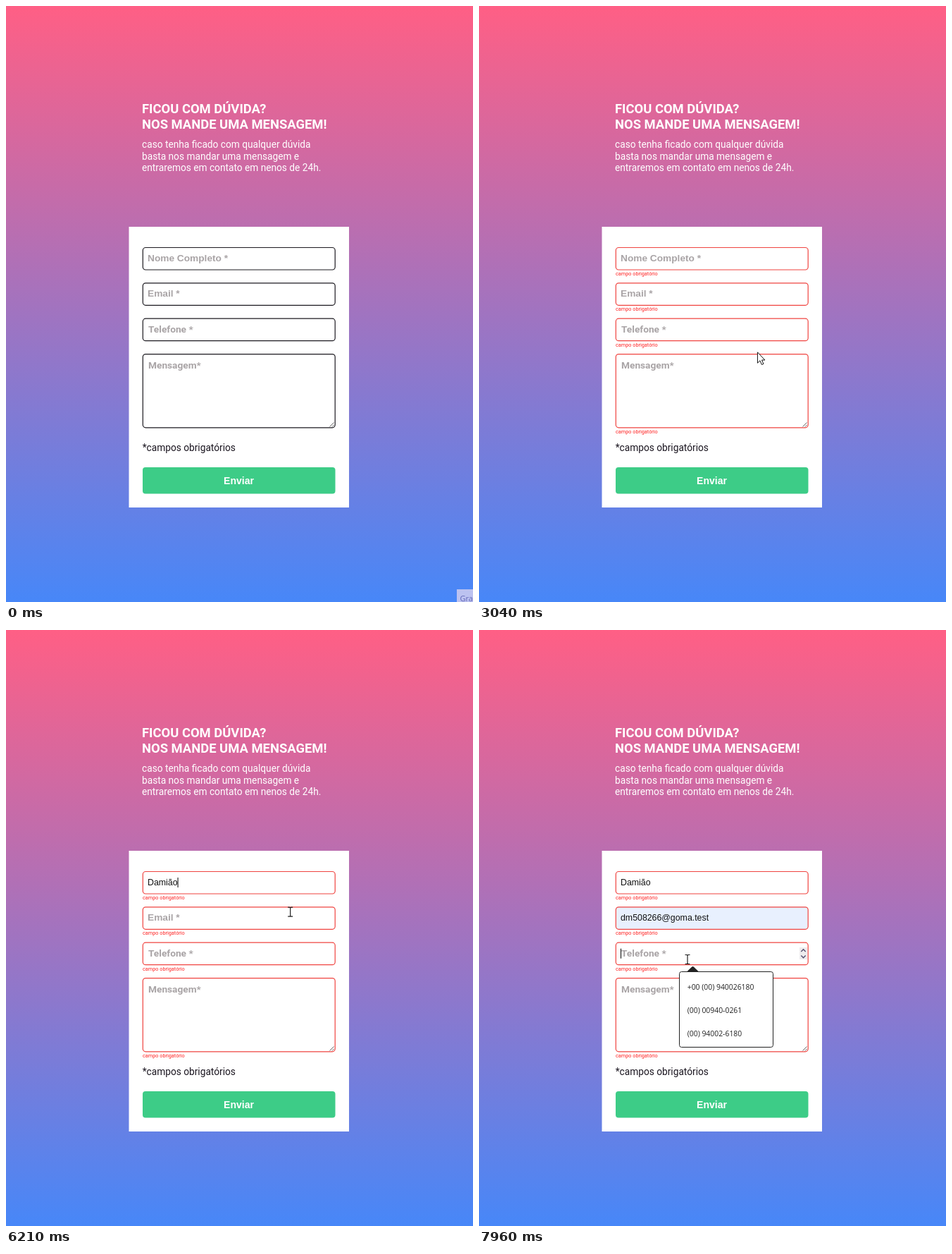
Write an HTML page that moves like this. It is 663 px wide and 845 px high and loops after 8000 ms.

```html
<!DOCTYPE html>
<html lang="pt-BR">
<head>
<meta charset="utf-8">
<title>Formulário de contato</title>
<style>
html, body { margin: 0; width: 100%; height: 100%; overflow: hidden; }
svg { display: block; width: 100vw; height: 100vh; }
text { white-space: pre; }
.title { font: 700 18.4px Roboto, sans-serif; fill: #fff; }
.body { font: 400 13.71px Roboto, sans-serif; }
.error { font: 400 7.3px Roboto, sans-serif; fill: #f22; }
.hint { font: 700 13.7px "Liberation Sans", Arial, sans-serif; fill: #a9a4a6; }
.hint.alt { font-family: Roboto, sans-serif; }
.value { font: 400 12.35px "Liberation Sans", Arial, sans-serif; fill: #111; }
.send { font: 700 14px "Liberation Sans", Arial, sans-serif; fill: #fff; }
.item { font: 400 10.4px "Open Sans", "Noto Sans", sans-serif; fill: #222; }
.tag { font: 400 11px "Open Sans", "Noto Sans", sans-serif; fill: #6468b8; }
</style>
</head>
<body>
<svg viewBox="0 0 663 845" preserveAspectRatio="none">
  <defs>
    <linearGradient id="sky" x1="0" y1="0" x2="0" y2="1">
      <stop offset="0" stop-color="#ff5f85"/>
      <stop offset="1" stop-color="#4787f8"/>
    </linearGradient>
  </defs>
  <rect width="663" height="845" fill="url(#sky)"/>
  <g class="title">
    <text x="193" y="152">FICOU COM DÚVIDA?</text>
    <text x="193" y="174">NOS MANDE UMA MENSAGEM!</text>
  </g>
  <g class="body" fill="#fff">
    <text x="193" y="201">caso tenha ficado com qualquer dúvida</text>
    <text x="193" y="217.5">basta nos mandar uma mensagem e</text>
    <text x="193" y="234">entraremos em contato em nenos de 24h.</text>
  </g>
  <rect x="174.5" y="313" width="312.5" height="398" fill="#fff"/>
  <g id="fields"></g>
  <path d="M459.5 596.5 465.5 590.5M463 596.5 465.5 594" stroke="#555" stroke-width=".9"/>
  <g id="spinner">
    <rect x="455" y="450" width="11" height="17" fill="#eeecee"/>
    <path d="M457.3 456 460.5 452.8 463.7 456M457.3 461.5 460.5 464.7 463.7 461.5" fill="none" stroke="#555070" stroke-width="1.4"/>
  </g>
  <text class="body" x="193.7" y="631" fill="#1b1620">*campos obrigatórios</text>
  <rect x="194" y="654" width="273.5" height="37.5" rx="4" fill="#3dcc87"/>
  <text class="send" x="330.5" y="678" text-anchor="middle">Enviar</text>
  <rect id="caret" width="1" height="14" fill="#000"/>
  <g id="popup"></g>
  <g id="tag">
    <rect x="640" y="827" width="23" height="18" fill="#bcc2f0"/>
    <text class="tag" x="644.5" y="843.5">Gravando</text>
  </g>
  <circle id="click" cx="344" cy="677" r="11.2" fill="#c8e600" opacity=".72"/>
  <g id="cursor" stroke-linejoin="round">
    <path id="arrow" d="M.5 0V15.4L4 12 6.5 17.7 9 16.6 6.6 11.2H11Z" fill="#fff" stroke="#111"/>
    <path id="hand" d="M-1.3 1Q.3-.8 1.7 1V7Q3.3 5.8 4.6 7.5 6.2 6.6 7.3 8.3 9.5 7.8 9.7 10V14.5L7.8 18V20.5H-.8V18.4L-5.4 12.4Q-5.6 10-3.6 10.6L-1.3 12.6Z" fill="#fff" stroke="#111"/>
    <path id="ibeam" d="M-3.5-6.5H-1L0-5.7 1-6.5H3.5M0-5.7V5.7M-3.5 6.5H-1L0 5.7 1 6.5H3.5" fill="none" stroke="#222" stroke-width="1.2"/>
  </g>
</svg>
<script>
const LOOP = 8000, STEP = 67;
const $ = id => document.getElementById(id);
const show = (el, on) => el.setAttribute('visibility', on ? 'visible' : 'hidden');
const clamp = v => Math.max(0, Math.min(1, v));

const NAME = 'Damião', MAIL = 'dm508266@goma.test';
const users = ['damica_0713', 'damica_0712'];
const mails = [MAIL, ...['mbiacaetano', 'norbertoiara', 'Mbiacaetano',
  'elainebarreto.valdura', 'brunabarretopinho418'].map(s => s + '@goma.test')];
const phones = ['+00 (00) 940026180', '(00) 00940-0261', '(00) 94002-6180'];

const fields = [
  { hint: 'Nome Completo *', x: 201, y: 342.5, h: 31.5 },
  { hint: 'Email *', x: 201, y: 392.8, h: 31.5 },
  { hint: 'Telefone *', x: 202, y: 443.2, h: 31.5, alt: true },
  { hint: 'Mensagem*', x: 202, y: 493.6, h: 104.2, alt: true }
];

// The screen repaints in bursts and rests in between.
const bursts = [[0, 0], [70, 70], [1000, 1690], [2020, 2100], [2630, 3380], [3440, 3910],
  [4180, 4240], [4700, 4700], [4980, 5050], [5250, 5660], [5930, 6690], [6760, 7560],
  [7630, 7630], [7960, 7960]];

// time, x, y of the pointer
const path = [
  [1000, 590, 833], [1134, 478, 790], [1268, 416, 760], [1480, 362, 705], [1690, 344.5, 678],
  [2630, 346, 676], [2850, 368, 600], [3100, 405, 450], [3380, 426, 371],
  [3440, 428, 363], [3580, 430, 353], [3700, 431, 359], [4180, 431, 359], [4240, 432, 359],
  [5930, 432, 362], [6130, 410, 392], [6280, 396, 409], [6420, 394, 412], [6690, 382, 442],
  [6760, 378, 444], [6960, 366, 448], [7100, 350, 451], [7229, 324, 455],
  [7370, 302, 462], [7480, 293.5, 464.5], [7560, 294, 465], [7630, 295, 465.5], [7960, 296, 467]
];

const popups = [
  { from: 3710, to: 4240, y: 382, w: 144, list: [MAIL, ...users, 'bruna', NAME], fadeIn: true },
  { from: 4240, to: 5050, y: 382, w: 144, list: [MAIL, ...users, NAME] },
  { from: 5050, to: 5310, y: 382, w: 101, list: [...users, NAME] },
  { from: 5310, to: 5640, y: 382, w: 67, list: [NAME], fadeOut: true },
  { from: 6400, to: 7270, y: 433, w: 210, list: mails, fadeIn: true, fadeOut: true, hover: 6540 },
  { from: 7430, to: LOOP, y: 484, w: 133, list: phones, fadeIn: true }
];
const keys = [4180, 4980, 5050, 5250, 5310, 5450];

$('fields').innerHTML = fields.map(f => `
  <rect x="194.3" y="${f.y}" width="272.9" height="${f.h}" rx="4" fill="#fff" stroke-width="1.2"/>
  <text class="hint${f.alt ? ' alt' : ''}" x="${f.x}" y="${f.y + (f.h > 50 ? 20.6 : 19.6)}">${f.hint}</text>
  <text class="value" x="201" y="${f.y + 19.6}"></text>
  <text class="error" x="194" y="${f.y + f.h + 7.8}">campo obrigatório</text>`).join('');
const all = cls => [...$('fields').querySelectorAll(cls)];
const boxes = all('rect'), hints = all('.hint'), values = all('.value'), errors = all('.error');

function snap(t) {
  const [a, b] = bursts.filter(([from]) => from <= t).pop();
  return t >= b ? b : a + Math.floor((t - a) / STEP) * STEP;
}

function pointer(t) {
  const i = path.findIndex(p => p[0] > t);
  if (i < 0) return path[path.length - 1].slice(1);
  if (i === 0) return path[0].slice(1);
  const [t0, x0, y0] = path[i - 1], [t1, x1, y1] = path[i];
  // Rest between bursts instead of drifting.
  const resting = bursts.some(([, end]) => end === t0) && t1 - t0 > 250;
  const k = resting ? 0 : (t - t0) / (t1 - t0);
  return [x0 + (x1 - x0) * k, y0 + (y1 - y0) * k];
}

function drawPopup(t) {
  const p = popups.find(p => t >= p.from && t < p.to);
  const g = $('popup');
  show(g, p);
  if (!p) return null;
  const { y, w, list } = p, x = 284.5, h = list.length * 33 + 8;
  const opacity = Math.min(p.fadeIn ? clamp((t - p.from + 30) / 130) : 1,
    p.fadeOut ? clamp((p.to - t) / 140) : 1);
  const scale = .952 + .048 * opacity, cx = x + w / 2, cy = y + h / 2;
  g.setAttribute('opacity', opacity);
  g.setAttribute('transform', `translate(${cx} ${cy}) scale(${scale}) translate(${-cx} ${-cy})`);
  g.innerHTML = `<path d="M295.5 ${y}L302 ${y - 6.3}Q303.5 ${y - 7.5} 305 ${y - 6.3}L311.5 ${y}Z" fill="#222"/>
    <rect x="${x}" y="${y + .5}" width="${w}" height="${h}" rx="3" fill="#fff" stroke="#222"/>` +
    (t >= p.hover ? `<rect x="285" y="${y + 4}" width="${w - 1}" height="33" fill="#d9e3ea"/>` : '') +
    list.map((s, i) => `<text class="item" x="295.7" y="${y + 26 + i * 33}">${s}</text>`).join('');
  return { x, y, w, h };
}

function drawFields(t) {
  const sent = t >= 2100, filled = t >= 6540;
  const text = [NAME.slice(0, keys.filter(k => t >= k).length), filled ? MAIL : '', '', ''];
  fields.forEach((f, i) => {
    boxes[i].setAttribute('stroke', sent ? '#f04440' : '#1c1a20');
    boxes[i].setAttribute('fill', i === 1 && filled ? '#e8f0fe' : '#fff');
    values[i].textContent = text[i];
    show(hints[i], !text[i]);
    show(errors[i], sent);
  });
  const focus = t >= 7400 ? 2 : t >= 6330 ? 1 : 0;
  const atStart = !text[focus] || (focus === 1 && t < 7090);
  const offset = atStart ? 0 : values[focus].getComputedTextLength();
  $('caret').setAttribute('x', 201 + offset);
  $('caret').setAttribute('y', fields[focus].y + 8.5);
  show($('caret'), t >= 3640 && !(t >= 4700 && t < 4980));
  show($('spinner'), t >= 7290);
}

function drawCursor(t, popup) {
  const [x, y] = pointer(t);
  const inside = (l, top, w, h) => x >= l && x <= l + w && y >= top && y <= top + h;
  const kind = popup && inside(popup.x, popup.y, popup.w, popup.h) ? 'arrow'
    : inside(194, 654, 273, 37) ? 'hand'
    : fields.some(f => inside(194, f.y, 273, f.h)) ? 'ibeam' : 'arrow';
  $('cursor').setAttribute('transform', `translate(${x} ${y})`);
  for (const id of ['arrow', 'hand', 'ibeam']) show($(id), t >= 1000 && id === kind);
}

function draw(now) {
  const t = snap(now % LOOP);
  show($('tag'), t < 70);
  show($('click'), t >= 2020 && t < 2100);
  drawFields(t);
  drawCursor(t, drawPopup(t));
}

function tick() {
  draw(performance.now());
  requestAnimationFrame(tick);
}
tick();
</script>
</body>
</html>
```
